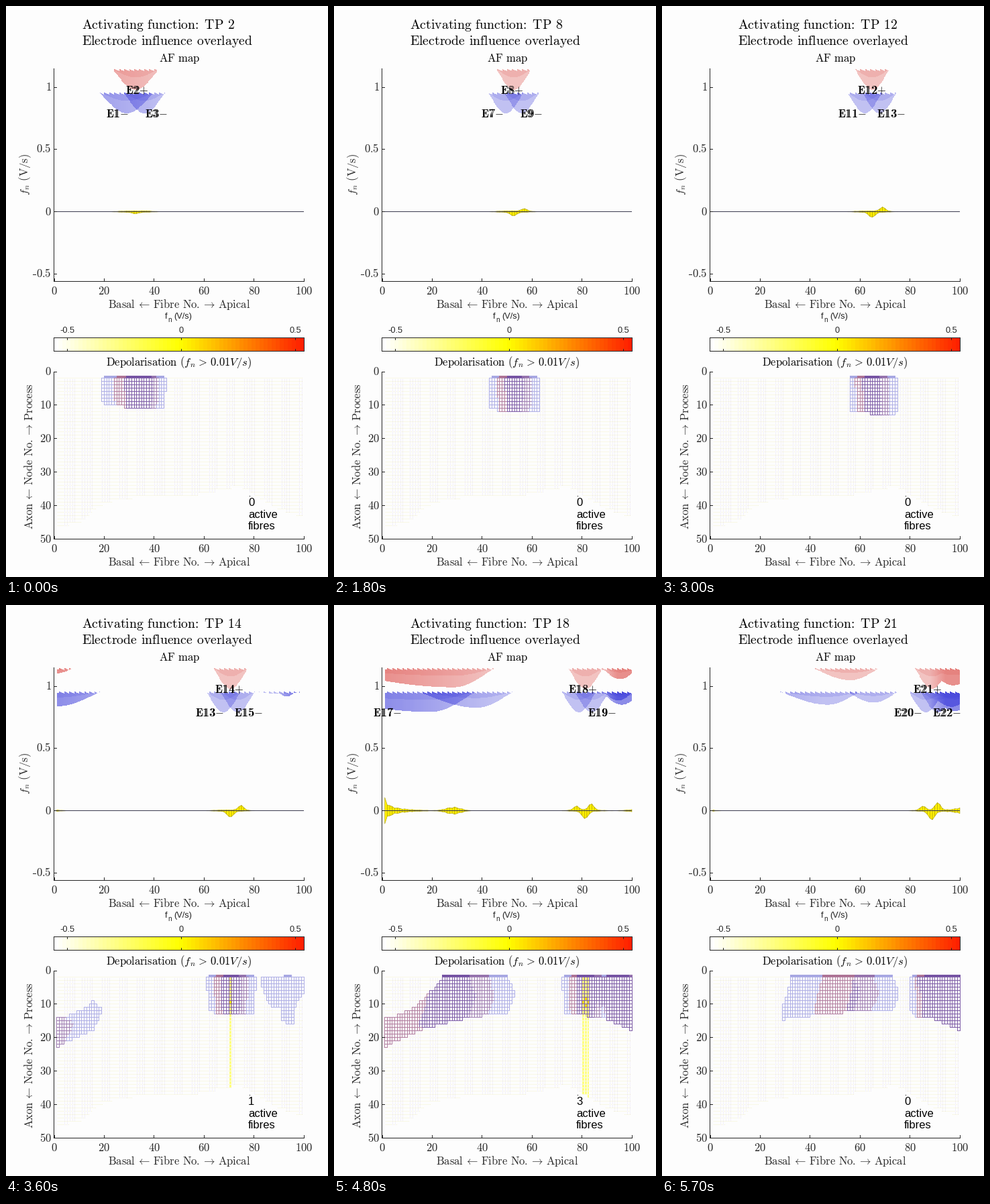
A matplotlib script for the animation above (6 s loop, 480 by 851 pixels).

```python
import numpy as np
import matplotlib.pyplot as plt
from matplotlib.animation import FuncAnimation
from matplotlib.collections import PolyCollection
from matplotlib.colors import LinearSegmentedColormap

W, H, DPI = 480, 851, 64
PT = 72 / DPI
BG, INK = "#fdfdfd", "#262626"
BLUE, RED = np.array([40, 40, 215]) / 255, np.array([215, 45, 40]) / 255
plt.rcParams.update({"mathtext.fontset": "cm", "font.family": "Liberation Sans"})

fig = plt.figure(figsize=(W / DPI, H / DPI), dpi=DPI, facecolor=BG)
ax = fig.add_axes([0, 0, 1, 1])
ax.set_xlim(0, W)
ax.set_ylim(H, 0)
ax.axis("off")


def X(fibre):
    return 72 + 3.72 * np.asarray(fibre, float)


def Y(value):
    return 306.5 - 185.5 * value


def K(node):
    return 545 + 4.98 * np.asarray(node, float)


def snap(v):
    return np.floor(v) + 0.5


def box(x0, x1, y0, y1):
    return [(x0, y0), (x1, y0), (x1, y1), (x0, y1)]


# ---------- text and lines ----------
ARROWS = {"<": r"\hspace{-0.2}\leftarrow\hspace{-0.2}",
          ">": r"\hspace{-0.2}\rightarrow\hspace{-0.2}"}


def roman(s):
    words = [ARROWS.get(w) or r"\mathrm{%s}" % w for w in s.split()]
    s = r"\hspace{0.38}".join(words)
    s = s.replace(":", r"\hspace{-0.2}:\hspace{-0.07}")
    return "$" + s.replace("No.", r"No.\hspace{-0.2}") + "$"


def bold_label(number, sign):
    # the bold face has no digits here, so each is struck twice
    digits = "".join(r"\mathrm{%s}\hspace{-0.49}\mathrm{%s}" % (d, d)
                     for d in str(number))
    return r"$\mathbf{E}%s{%s}$" % (digits, sign)


def text(x, y, s, px=16.6, ha="center", color=INK, rot=0, z=6):
    return ax.text(x, y, s, fontsize=px * PT, ha=ha, va="baseline", color=color,
                   rotation=rot, rotation_mode="anchor", zorder=z)


def line(xs, ys, color=INK, z=5):
    ax.plot(xs, ys, color=color, lw=PT, zorder=z, antialiased=False, snap=False,
            solid_capstyle="butt")


def axes_frame(top, bottom, label_y):
    line([71.5, 71.5], [top, bottom])
    line([71, 444.5], [bottom, bottom])
    for f in range(0, 101, 20):
        x = snap(X(f))
        line([x, x], [bottom, bottom - 4])
        text(X(f), label_y, f"${f}$")
    text(258.5, label_y + 20, roman("Basal < Fibre No. > Apical"))


def y_tick(y, s):
    line([72, 76], [snap(y), snap(y)])
    text(67.5, snap(y) + 5, f"${s}$", ha="right")


axes_frame(93, 410.5, 430)
axes_frame(545, 794.5, 814)
for v in (1, 0.5, 0, -0.5):
    y_tick(Y(v), abs(v))
line([40.5, 45], [400.5, 400.5])
for k in range(0, 51, 10):
    y_tick(K(k), k)

title = text(113, 34.5, "", 19.8, "left", "black")
text(113, 58.5, roman("Electrode influence overlayed"), 19.8, "left", "black")
text(258.5, 83.5, roman("AF map"), color="black")
text(33, 251, r"$f_n\hspace{0.38}\mathrm{(V/s)}$", rot=90)
text(40, 671, roman("Axon < Node No. > Process"), rot=90)
text(258, 536.5, r"$\mathrm{Depolarisation}\hspace{0.38}(f_n\hspace{0.12}>"
     r"\hspace{0.12}0.01V/s)$", color="black")

# ---------- colour bar ----------
heat = LinearSegmentedColormap.from_list("heat", ["white", "yellow", "#ff2000"])
STEPS = 62
for j in range(STEPS):
    x = 72 + 6 * j
    ax.fill(*zip(*box(x, x + 6, 494, 514)), color=heat(j / (STEPS - 1)), lw=0,
            antialiased=False, zorder=2)
line([71.5, 444.5, 444.5, 71.5, 71.5], [494.5, 494.5, 514.5, 514.5, 494.5])
for x, s in ((91.5, "-0.5"), (261.5, "0"), (431.5, "0.5")):
    line([x, x], [495, 498])
    line([x, x], [511, 514])
    text(x, 487, s, 12.8)
text(237, 466, "f", 12.8, "left")
text(241, 471, "n", 10, "left")
text(250, 466, "(V/s)", 12.8, "left")

# ---------- active fibre counter ----------
counter = text(361, 745, "0", 16.6, "left", "black")
text(361, 763, "active", 16.6, "left", "black")
text(361, 780, "fibres", 16.6, "left", "black")
ax.plot([362.5], [730.5], ",", color="black")

# ---------- pale node mesh ----------
fib = np.arange(1, 100)


def last_node(f):
    return np.round(np.interp(f, [1, 10, 17, 26, 54, 74, 90, 99],
                              [46, 45, 40, 37.6, 37, 34, 41, 43]))


def dots(x, y, keep, color):
    ax.plot(snap(x[keep]), snap(y[keep]), ",", color=color, zorder=1)


gx, gk = np.meshgrid(np.arange(76, 441, 2.0), np.arange(2, 47))
dots(gx, K(gk), last_node((gx - 72) / 3.72) >= gk, "#f5f3cf")
gf, gy = np.meshgrid(fib[(fib - 11) % 7.2 < 4.3], np.arange(556, 776, 2.0))
dots(X(gf), gy, gy <= K(last_node(gf)), "#eae6f4")

line([72, 444], [306.5, 306.5], "#3c3c50", z=4)


# ---------- electrode influence ----------
def centre(e):
    return 25.3 + 3.65 * e - 0.03 * e * e


def basal_centre(e):
    return max(0, 9.2 * (e - 14.9))


def lobe(x, c, left, right, depth):
    u = np.where(x < c, (c - x) / left, (x - c) / right)
    return depth * np.cos(np.pi / 2 * np.clip(u, 0, 1)) ** 1.15


def lobes(e, x):
    """Depth in pixels of the main/apical part and of the basal part."""
    w = 7 + 4 * np.exp((1 - e) / 2)
    near, far = lobe(x, centre(e), w, w, 30), 0 * x
    if e >= 15:
        t = (e - 15) / 7
        near = np.maximum(near, lobe(x, 93 + 5 * t, 4 + 8 * t, 4 + 8 * t, 7 + 21 * t))
        near = np.maximum(near, lobe(x, 88, 7, 16, 3))
    if e >= 14:
        left = np.interp(e, [18, 19, 22], [55, 24, 11])
        right = min(10 * (e - 13.2), 20 - 1.67 * (e - 16))
        depth = np.interp(e, [13.4, 15.5, 17.5, 20, 22], [0, 28, 30, 19, 16])
        far = lobe(x, basal_centre(e), left, right, depth)
    return near, far


xs = np.arange(1, 100, 0.25)
teeth = 3 * (xs * 0.5 % 1)
# many overlapping node layers at both ends of the array
dense = np.clip(1 - xs / 45, 0, 1) + np.clip((xs - 88) / 6, 0, 1)


def upper_quads(n):
    quads, colors = [], []
    for e, base, color in ((n, 94, RED), (n - 1, 129, BLUE), (n + 1, 129, BLUE)):
        depth = np.maximum(*lobes(e, xs)) * 1.03
        for part, alpha in ((1, 0.28), (0.4, 0.12)):
            for i in np.flatnonzero(depth * part > teeth + 0.5):
                a = X(xs[i])
                quads.append(box(a, a + 0.93, base + teeth[i], base + depth[i] * part))
                colors.append((*color, alpha + 0.25 * dense[i] * (part == 1)))
    return quads, colors


MAIN_END = 9 + 0.055 * fib + 0.3 * np.maximum(0, fib - 88)
BASAL_TOP = np.maximum(2, 14.2 - 0.0215 * fib ** 2)
BASAL_END = 11 + 12.3 * np.exp(-fib / 25)


def influence(e):
    """Grid of fibres by nodes that the electrode reaches."""
    grid = np.zeros((len(fib), 26), bool)
    near, far = lobes(e, fib.astype(float))
    node = np.arange(26)
    for i, f in enumerate(fib):
        spans = []
        if near[i] > 1:
            spans.append((2, 2 + (MAIN_END[i] - 2) * min(1, near[i] / 4), near[i]))
        if far[i] > 1:
            top, end = BASAL_TOP[i], BASAL_END[i]
            mid = end - 0.5 if f < basal_centre(e) else (top + end) / 2
            s = min(1, far[i] / 6)
            spans.append((mid + (top - mid) * s, mid + (end - mid) * s, far[i]))
        for lo, hi, depth in spans:
            lo = round(lo)
            grid[i] |= (node >= lo) & (node < max(round(hi), lo + 1))
            grid[i, 1] |= lo <= 2 and depth > 5
    return grid


def lower_cells(n):
    shape = (len(fib), 26, 3)
    color = np.ones(shape)
    reach = np.zeros(shape[:2], bool)
    alpha = np.where(np.arange(26) == 1, 0.4, 0.36)[None, :, None]
    for e, c in ((n - 1, BLUE), (n, RED), (n + 1, BLUE)):
        g = influence(e)
        reach |= g
        color = np.where(g[..., None], color + (c * 0.85 - color) * alpha, color)
    quads, faces, edges = [], [], []
    for i, k in zip(*np.nonzero(reach)):
        bar = k == 1
        y0, y1 = (551.5, 555.5) if bar else (snap(K(k)), snap(K(k + 1)))
        quads.append(box(snap(X(fib[i])), snap(X(fib[i] + 1)), y0, y1))
        edges.append(color[i, k])
        faces.append(color[i, k] if bar else (0.99, 0.99, 0.99))
    return quads, faces, edges


# ---------- activating function ----------
def af_quads(n):
    f = np.arange(1, 101.0)
    c = centre(n)

    def bump(m, w, a):
        return a * np.exp(-((f - m) / w) ** 2)

    swell = np.exp(-((n - 17.5) / 2) ** 2)
    both = bump(c, 8, 1.1) + bump(basal_centre(n), 4, 5 * swell)
    both += 9 * swell * (np.exp(1 - f) + np.exp((1 - f) / 6))
    both += 0.8 * max(0, n - 16) * np.exp((f - 100) / 3)
    both *= 1 + 0.2 * np.sin(2.2 * f)
    late = n > 16
    up = both + bump(c + (2.4 if late else 4.3), 1.5, 0.55 * (n - 1))
    up += bump(c - 3.5, 1.5, 6 * late)
    down = both + bump(c, 1.7, 2 + 0.55 * (n - 2))
    return [[(X(f[i]), 306.5 - up[i]), (X(f[i + 1]), 306.5 - up[i + 1]),
             (X(f[i + 1]), 306.5 + down[i + 1]), (X(f[i]), 306.5 + down[i])]
            for i in np.flatnonzero(up[:-1] + down[:-1] > 0.4)]


# ---------- animated artists ----------
def collection(z, **kw):
    c = PolyCollection([], zorder=z, **kw)
    return ax.add_collection(c, autolim=False)


shade = collection(3, edgecolors="none", antialiased=False)
cells = collection(3, linewidths=PT, antialiased=False, snap=False)
active = collection(4, edgecolors="none", antialiased=False)
curve = collection(3.5, facecolors="#ffee00", edgecolors="#a09400", linewidths=0.5 * PT)
labels = [text(0, y, "", 16.6, "left", "black", z=8) for y in (165.5, 130.5, 165.5)]
FIRING = {14: 1, 17: 3, 18: 3, 20: 2}


def label_x(n, side):
    if n + side in (16, 17):        # strongest at the basal end
        return 58 + 47 * (side == 1)
    return X(centre(n)) - 14 - 0.65 * n + 29 * side


def active_quads(n):
    quads, colors = [], []
    first = round(centre(n)) - 1
    for f in range(first, first + FIRING.get(n, 0)):
        for k in range(2, int(last_node(f))):
            quads.append(box(snap(X(f)), snap(X(f + 1)) - 1,
                             snap(K(k)), snap(K(k + 1)) - 1))
            hot = 8 <= k <= 10 and (f + k) % 2
            colors.append("#fae114" if hot else "#ffff82")
    return quads, colors


def draw(frame):
    n = frame + 2
    title.set_text(roman(f"Activating function: TP {n}"))
    for side, label in zip((-1, 0, 1), labels):
        label.set_text(bold_label(n + side, "-" if side else "+"))
        label.set_x(label_x(n, side))
    quads, colors = upper_quads(n)
    shade.set_verts(quads)
    shade.set_facecolor(colors)
    quads, faces, edges = lower_cells(n)
    cells.set_verts(quads)
    cells.set_facecolor(faces)
    cells.set_edgecolor(edges)
    curve.set_verts(af_quads(n))
    quads, colors = active_quads(n)
    active.set_verts(quads)
    active.set_facecolor(colors or "none")
    counter.set_text(str(FIRING.get(n, 0)))
    return []


anim = FuncAnimation(fig, draw, frames=20, interval=300, repeat=True,
                     repeat_delay=0, blit=False)
plt.show()
```
